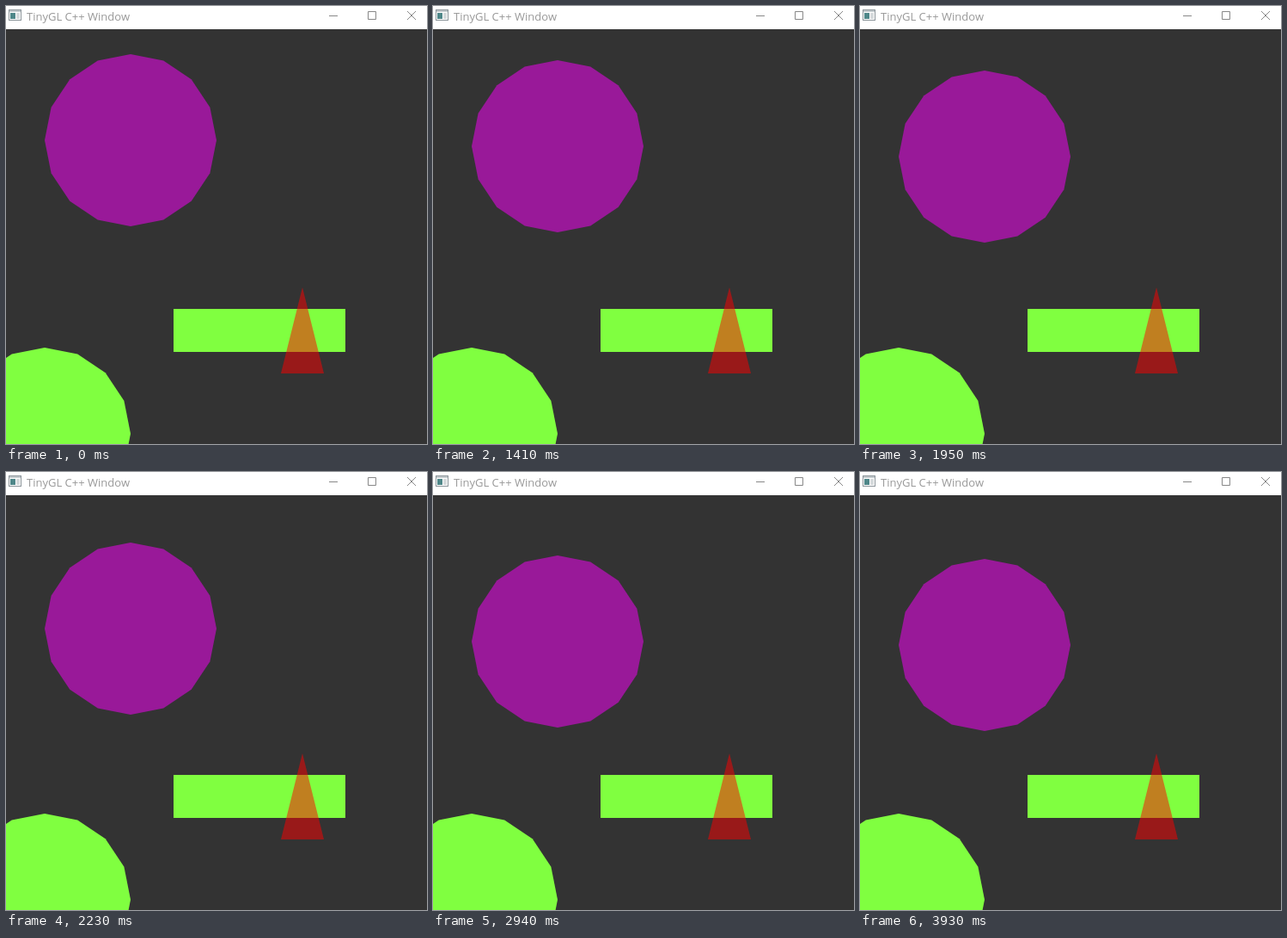
Recreate the animation shown at these times as an HTML page. Size 490 px wide and 509 px high, loop 4.03 s.

```html
<!DOCTYPE html>
<html lang="en">
<head>
<meta charset="utf-8">
<title>TinyGL C++ Window</title>
<style>
  html, body { margin: 0; width: 100%; height: 100%; overflow: hidden; background: #333; }
  svg { display: block; width: 490px; height: 509px; }
  text { font: 13px "Open Sans", "Noto Sans", sans-serif; fill: #999; }
</style>
</head>
<body>
<svg viewBox="0 0 490 509">
  <rect width="490" height="509" fill="#333"/>
  <polygon id="still" fill="#80ff40" transform="translate(45 497)"/>
  <rect x="195" y="352" width="200" height="50" fill="#80ff40"/>
  <polygon points="345,327 370,427 320,427" fill="#f00" fill-opacity=".5"/>
  <polygon id="ball" fill="#991999"/>

  <rect width="490" height="27" fill="#fff"/>
  <rect x="3.5" y="4.5" width="14" height="12" fill="#fff" stroke="#8b9499"/>
  <rect x="4" y="5" width="13" height="2" fill="#c3cacd"/>
  <rect x="5" y="8" width="6" height="7" fill="#4f8789"/>
  <rect x="12" y="8" width="4" height="7" fill="#d5dadc"/>
  <text x="24" y="17">TinyGL C++ Window</text>
  <g fill="none" stroke="#888">
    <path d="M376 11.5h10M421.5 6.5h9v9h-9z"/>
    <path d="M467 6l10 10M477 6l-10 10"/>
  </g>
</svg>
<script>
const LOOP = 4030, TICK = 140, LEAD = 20;
const R = 100, SIDES = 16;

const ring = Array.from({ length: SIDES }, (_, i) => {
  const a = i * 2 * Math.PI / SIDES;
  return [R * Math.cos(a), R * Math.sin(a)];
}).join(" ");
const ball = document.getElementById("ball");
ball.setAttribute("points", ring);
document.getElementById("still").setAttribute("points", ring);

// The ball bobs on a cosine, sampled once per tick and snapped to whole pixels.
function ballY(t) {
  const tick = Math.floor((t + LEAD) / TICK);
  return Math.round(177.6 - 24.75 * Math.cos(0.1412 * (tick - 3.5)));
}

const start = performance.now();
function draw(now) {
  const t = Math.max(0, now - start) % LOOP;
  ball.setAttribute("transform", `translate(145 ${ballY(t)})`);
  requestAnimationFrame(draw);
}
draw(start);
</script>
</body>
</html>
```
